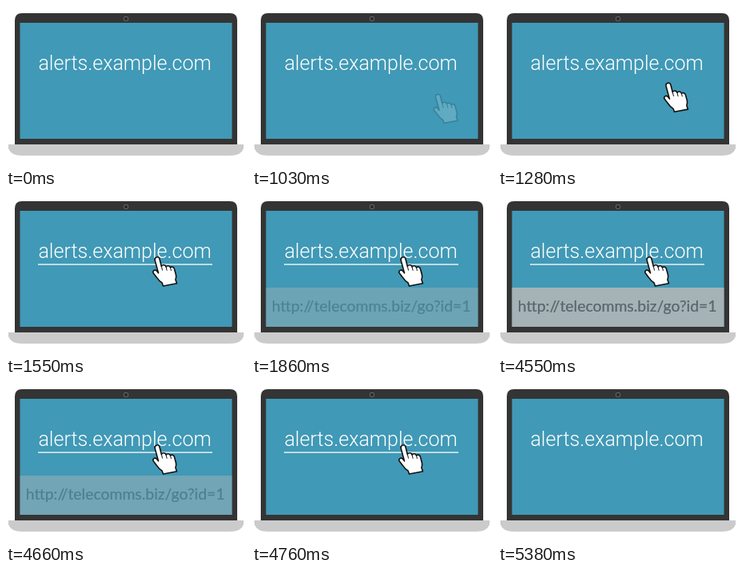
These frames come from a looping animation (300 by 200 pixels, 7.01 s). An HTML page:

```html
<!DOCTYPE html>
<html lang="en">
<head>
<meta charset="utf-8">
<title>Check the link</title>
<style>
html, body { margin: 0; width: 100%; height: 100%; overflow: hidden; background: #fff; }
svg { display: block; width: 100%; height: 100%; }
.link { font: 300 25.07px Roboto, sans-serif; fill: #fff; }
.url { font: 400 19.4px Lato, sans-serif; fill: #5c5d5e; stroke: #5c5d5e; stroke-width: .2px; }
</style>
</head>
<body>
<svg viewBox="0 0 300 200">
  <path d="M11 173.5V18Q11 9 20 9H280Q289 9 289 18V173.5Z" fill="#343434"/>
  <rect x="147.5" y="13.5" width="5" height="5" rx="1.5" fill="#2b2b2b" stroke="#777" stroke-width=".8"/>
  <rect x="17.5" y="21" width="265" height="145" fill="#4099b6"/>
  <path d="M3 173H297V178Q294 187 280 187H20Q6 187 3 178Z" fill="#cbcbcb"/>
  <text class="link" x="40.4" y="80">alerts.example.com</text>
  <rect id="line" x="40" y="87.4" width="218" height="1.3" fill="#fff"/>
  <g id="panel">
    <rect x="17.5" y="117" width="265" height="49" fill="#b6b7b7"/>
    <text class="url" x="24.8" y="147">http://telecomms.biz/go?id=1</text>
  </g>
  <g id="hand" stroke="#111" stroke-width="1.6" stroke-linejoin="round" stroke-linecap="round">
    <path fill="#fff" d="M186.1 82.6C185.3 78.8 190.9 77.2 191.9 81L194.3 90.2C195.9 87.9 199.3 88.4 200.1 91C201.5 88.9 204.7 89.4 205.5 92C207.1 90.4 209.9 91.2 210.5 93.8L212.5 101.2Q213.1 104.2 211.9 107L213.5 111.8L196.5 115L195.1 111Q191.1 108.6 188.5 104.4L184.3 99C182.5 96 186.1 93.8 188.5 96.2L190.5 98.8Z"/>
    <path fill="none" stroke-width="1" d="M194.3 90.2L195.5 95.2M200.1 91L201.1 95.4M205.5 92L206.4 95.6"/>
  </g>
</svg>
<script>
const LOOP = 7010;
const el = id => document.getElementById(id);
const line = el("line"), panel = el("panel"), hand = el("hand");
const clamp = v => Math.min(1, Math.max(0, v));
const ease = p => p * p * (3 - 2 * p);

// progress from 0 to 1 in n equal hops
const hops = (t, from, to, n) =>
  clamp(Math.floor((t - from) / (to - from) * n + 1e-4) / n);

function pose(t) {
  if (t < 1030) return { x: 0, y: 0, hand: 0, line: 0, panel: 0 };
  if (t < 4900) {
    const p = hops(t, 1030, 1550, 15), away = 1 - ease(p);
    const up = t < 1760 ? 0 : (1 + 7 * hops(t, 1760, 2000, 7)) / 8;
    const down = t < 4550 ? 1 : 6 / 7 * (1 - hops(t, 4550, 4760, 6));
    return {
      x: 43.5 * away, y: 31.5 * away,
      hand: clamp(0.17 + p * 2),
      line: clamp((p - 0.8) * 5),
      panel: Math.min(up, down)
    };
  }
  const p = (1 + 14 * hops(t, 4900, 5380, 14)) / 15, away = ease(p);
  return {
    x: 33 * away, y: 24 * away,
    hand: clamp((1 - p) * 2),
    line: clamp(1 - p * 5),
    panel: 0
  };
}

function draw(t) {
  const s = pose(t);
  hand.setAttribute("transform", `translate(${s.x} ${s.y})`);
  hand.setAttribute("opacity", s.hand);
  line.setAttribute("opacity", s.line);
  panel.setAttribute("opacity", s.panel);
}

let start;
function tick(now) {
  start ??= now;
  draw((now - start) % LOOP);
  requestAnimationFrame(tick);
}
draw(0);
requestAnimationFrame(tick);
</script>
</body>
</html>
```
